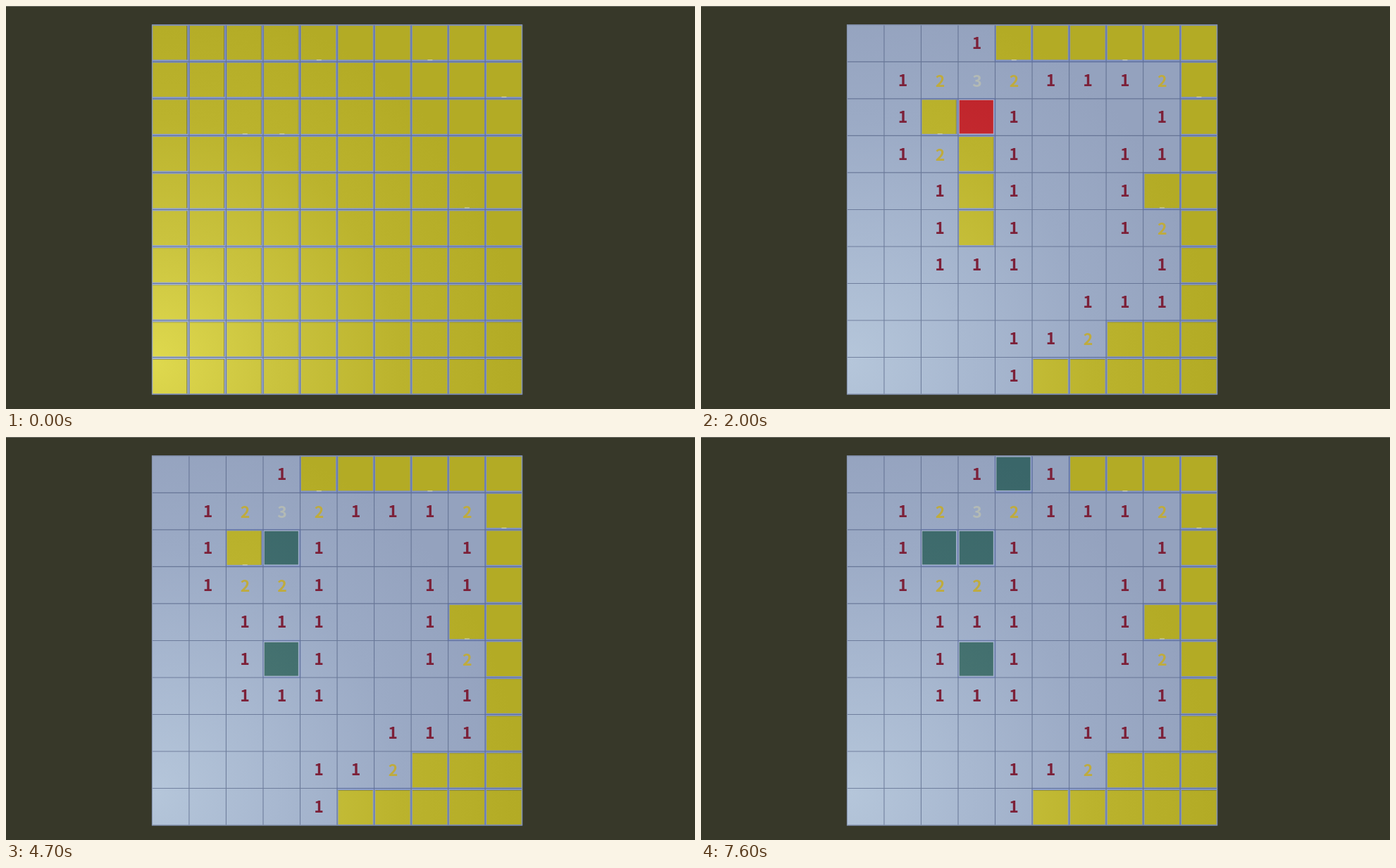
An HTML page with a canvas for the animation above (8 s loop, 978 by 573 pixels).

```html
<!DOCTYPE html>
<html lang="en">
<head>
<meta charset="utf-8">
<title>Minesweeper</title>
<style>
  html, body { margin: 0; width: 100%; height: 100%; overflow: hidden; background: #373829; }
  canvas { display: block; }
</style>
</head>
<body>
<canvas id="stage" width="978" height="573"></canvas>
<script>
const ctx = document.getElementById('stage').getContext('2d');
const LOOP = 8000, N = 10, X0 = 207.4, Y0 = 26.8, PITCH = 52.53;
const SIZE = N * PITCH;

// '#' covered, '.' empty, digit = neighbouring mines
const opened = [
  '...1######',
  '.12321112#',
  '.1##1...1#',
  '.12#1..11#',
  '..1#1..1##',
  '..1#1..12#',
  '..111...1#',
  '......111#',
  '....112###',
  '....1#####'
];

// time, column, row, new state: R = being checked, F = flagged mine
const moves = [
  [400, 4, 3, '1'],
  [800, 4, 4, 'R'], [900, 4, 4, '1'],
  [1100, 5, 4, 'R'], [1300, 5, 4, 'open'],
  [2000, 3, 2, 'R'], [2500, 3, 2, 'F'],
  [3200, 3, 5, 'R'], [3600, 3, 5, 'F'],
  [3800, 3, 4, 'R'], [3900, 3, 4, '1'],
  [4400, 3, 3, 'R'], [4700, 3, 3, '2'],
  [5400, 2, 2, 'R'], [5800, 2, 2, 'F'],
  [6600, 4, 0, 'R'], [6900, 4, 0, 'F'],
  [7500, 5, 0, 'R'], [7600, 5, 0, '1']
];

const glints = [[4, 0], [7, 0], [9, 1], [2, 2], [3, 2], [8, 4]];

// Light falls from the lower left corner of the board
function lit(...colors) {
  const g = ctx.createRadialGradient(210, 505, 0, 210, 505, 520);
  colors.forEach((c, i) => g.addColorStop(i / (colors.length - 1), c));
  return g;
}
const paint = {
  floor: lit('#b5c6da', '#a8b8d0', '#9baac5', '#94a2be'),
  frame: lit('#a5b4d2', '#98a9d0', '#8a9ccb', '#8193c4'),
  '#': lit('#dfd94e', '#cac33e', '#bbb32d', '#b3ab25'),
  R: lit('#dc424a', '#d1363d', '#c4292f', '#b92027'),
  F: lit('#528079', '#497672', '#3f6c6d', '#3a6669')
};
const ink = { 1: '#7c2038', 2: '#bfab3d', 3: '#b3bab5' };

function boardAt(t) {
  let cells = opened.map(() => Array(N).fill('#'));
  for (const [time, c, r, state] of moves) {
    if (time > t) break;
    if (state === 'open') cells = opened.map(row => [...row]);
    else cells[r][c] = state;
  }
  return cells;
}

function rect(x0, y0, x1, y1, fill) {
  ctx.fillStyle = fill;
  ctx.fillRect(x0, y0, x1 - x0, y1 - y0);
}

function drawFrame(c, r) {
  const x = X0 + c * PITCH, y = Y0 + r * PITCH;
  rect(x - 1, y - 1, x + PITCH + 1, y + PITCH + 1, paint.frame);
}

function drawCap(c, r, state) {
  const x = X0 + c * PITCH, y = Y0 + r * PITCH;
  const left = x + 0.9 + c * 0.12, right = x + 49.7 + c * 0.2;
  const top = y + 1.3 + r * 0.13, bottom = y + 49.6 + r * 0.2;
  rect(left, top, right, bottom, paint[state]);
  if (state !== '#') {
    ctx.strokeStyle = 'rgba(200,208,222,.65)';
    ctx.lineWidth = 1;
    ctx.strokeRect(left, top, right - left, bottom - top);
    return;
  }
  // visible sides of the tile
  if (c < 4) rect(right - 0.7, top, right + 0.3, bottom, `rgba(80,82,50,${0.7 - c * 0.15})`);
  if (r > 5) rect(left, top, right, top + 1, `rgba(110,108,50,${(r - 5) * 0.13})`);
}

function drawDigit(c, r, d) {
  const drop = d === '1' ? 0 : 1;
  ctx.fillStyle = ink[d];
  ctx.fillText(d, X0 + (c + 0.5) * PITCH + 0.3 + drop * 0.5, Y0 + r * PITCH + 34.3 + drop);
}

function drawGrid() {
  ctx.beginPath();
  for (let i = 0; i <= N; i++) {
    const p = i * PITCH;
    ctx.moveTo(X0 + p, Y0);
    ctx.lineTo(X0 + p, Y0 + SIZE);
    ctx.moveTo(X0, Y0 + p);
    ctx.lineTo(X0 + SIZE, Y0 + p);
  }
  ctx.strokeStyle = 'rgba(75,90,125,.62)';
  ctx.lineWidth = 1.1;
  ctx.stroke();
  ctx.strokeStyle = '#8c9ab4';
  ctx.lineWidth = 1;
  ctx.strokeRect(X0, Y0, SIZE, SIZE);
}

function draw(t) {
  const cells = boardAt(t);
  const each = fn => cells.forEach((row, r) => row.forEach((s, c) => fn(c, r, s)));
  const isCap = s => s in paint;

  rect(0, 0, 978, 573, '#373829');
  rect(0, 0, 978, 1, '#6c6d65');
  rect(X0, Y0, X0 + SIZE, Y0 + SIZE, paint.floor);

  ctx.save();
  ctx.beginPath();
  ctx.rect(X0, Y0, SIZE, SIZE);
  ctx.clip();
  each((c, r, s) => { if (isCap(s)) drawFrame(c, r); });
  ctx.restore();

  drawGrid();
  ctx.font = '700 23px "Noto Sans CJK JP", "Noto Sans CJK SC", "Noto Sans CJK", "Open Sans", sans-serif';
  ctx.textAlign = 'center';
  each((c, r, s) => {
    if (isCap(s)) drawCap(c, r, s);
    else if (s !== '.') drawDigit(c, r, s);
  });
  for (const [c, r] of glints) {
    const x = X0 + (c + 0.5) * PITCH, y = Y0 + r * PITCH + 49.5;
    if (cells[r][c] === '#') rect(x - 3, y, x + 4, y + 1, '#d5d6b4');
  }
}

let start;
function tick(now) {
  start ??= now;
  draw((now - start) % LOOP);
  requestAnimationFrame(tick);
}
draw(0);
requestAnimationFrame(tick);
</script>
</body>
</html>
```
